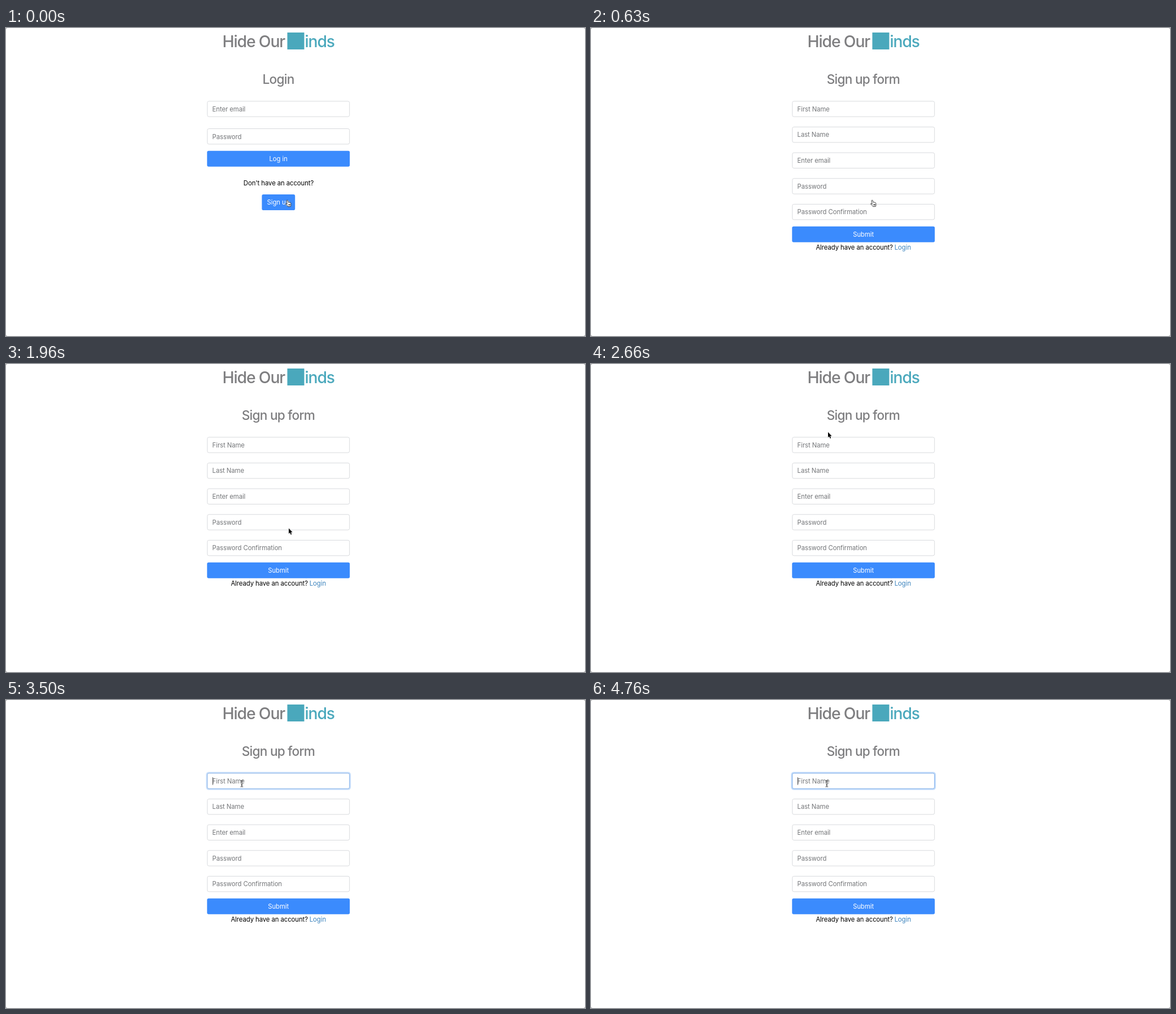
Recreate the animation shown at these times as an HTML page. Size 1026 by 546 pixels, loop 4.9 s.

```html
<!DOCTYPE html>
<html lang="en">
<head>
<meta charset="utf-8">
<title>Sign up</title>
<style>
  html, body { margin: 0; width: 100%; height: 100%; overflow: hidden; background: #fff; }
  svg { display: block; width: 100%; height: 100%; }
  text {
    font: 400 11.3px Inter, "Open Sans", sans-serif;
    font-optical-sizing: none;
    letter-spacing: -.06px;
    white-space: pre;
  }
  .brand { font-size: 28.3px; font-weight: 500; letter-spacing: -1.1px; }
  .heading { font-size: 22.7px; font-weight: 500; letter-spacing: -.78px; }
  .brand, .heading { fill: #7e7e80; }
  .mid { text-anchor: middle; }
  .hint { fill: #747679; }
  .light { fill: #fff; }
  .link { fill: #3b83bd; }
  .teal { fill: #4aa8bc; }
  .field { fill: #fff; stroke: #d8dadd; }
  .button { fill: #3b8bfd; }
</style>
</head>
<body>
<svg viewBox="0 0 1026 546" preserveAspectRatio="none">
  <rect width="1026" height="546" fill="#aaa"/>
  <rect width="1026" height="546" rx="3" fill="#fff"/>

  <text class="brand" x="383.5" y="34">Hide Our</text>
  <rect class="teal" x="498.5" y="8" width="30" height="30"/>
  <text class="brand teal" x="529.5" y="34">inds</text>

  <g id="login">
    <text class="heading mid" x="482.6" y="98.6">Login</text>
    <text class="mid" x="483" y="279">Don't have an account?</text>
    <rect id="buttonRing" x="452.4" y="293.9" width="60.8" height="30.2" rx="3.6"
          fill="none" stroke="#a9cffa" stroke-width="2.2"/>
    <rect class="button" x="453.4" y="295" width="58.8" height="28" rx="2.8"/>
    <text class="light mid" x="482.6" y="313.4">Sign up</text>
  </g>

  <g id="signup">
    <text class="heading mid" x="482.4" y="98.6">Sign up form</text>
    <text x="398.4" y="393">Already have an account?</text>
    <text class="link" x="537.8" y="393">Login</text>
  </g>

  <g id="focus">
    <rect x="355.6" y="128.6" width="254.3" height="29.8" rx="3.8"
          fill="none" stroke="#c3dcfa" stroke-width="2.4"/>
    <rect x="356.8" y="129.8" width="251.9" height="27.4" rx="2.8"
          fill="none" stroke="#85b4f0"/>
  </g>
  <path id="caret" d="M366.5 137V150.5" stroke="#333" stroke-width=".9"/>

  <path id="hand" fill="#fff" stroke="#222" stroke-width=".9" stroke-linejoin="round"
        d="M3 1.2Q3.9.6 4.4 1.8L5.6 5.2Q6.4 4.6 7 5.2Q7.9 4.7 8.5 5.4Q9.6 5.1 9.9 6.4L10.2 9.5Q10.2 10.6 9.6 12.4L5 12.6Q3.8 10.8 1 8.2Q.6 7 2 7.2L3.4 8.4L2.4 2.4Q2.3 1.5 3 1.2ZM6 8.2V10.6M7.4 8.2V10.6M8.7 8.2V10.4"/>
  <path id="arrow" fill="#000" stroke="#fff" stroke-width=".8" paint-order="stroke"
        d="M0 0V9.4L2.1 7.5L3.7 11.2L5.3 10.5L3.8 7H6.7Z"/>
  <path id="beam" fill="none" stroke="#222" stroke-width="1"
        d="M-2.2 -5.7Q0 -5.6 0 -4.4Q0 -5.6 2.2 -5.7M0 -4.4V4.4M-2.2 5.7Q0 5.6 0 4.4Q0 5.6 2.2 5.7M-1.3 2H1.3"/>
</svg>
<script>
const LOOP = 4900;
const byId = id => document.getElementById(id);

function add(parent, tag, attrs, text = '') {
  const node = document.createElementNS('http://www.w3.org/2000/svg', tag);
  for (const key in attrs) node.setAttribute(key, attrs[key]);
  node.textContent = text;
  parent.append(node);
}

function field(parent, y, hint) {
  add(parent, 'rect', { class: 'field', x: 356.8, y: y - 13.7, width: 251.9, height: 27.4, rx: 2.8 });
  add(parent, 'text', { class: 'hint', x: 365.6, y: y + 4.3 }, hint);
}

function wideButton(parent, y, label) {
  add(parent, 'rect', { class: 'button', x: 356.3, y: y - 14, width: 252.9, height: 28, rx: 2.8 });
  add(parent, 'text', { class: 'light mid', x: 482.7, y: y + 4.4 }, label);
}

// Hard steps: each [time, value] holds until the next one.
function play(id, property, steps) {
  const frames = steps.map(([time, value]) =>
    ({ offset: time / LOOP, [property]: value, easing: 'step-end' }));
  frames.push({ ...frames.at(-1), offset: 1 });
  byId(id).animate(frames, { duration: LOOP, iterations: Infinity });
}

const move = (x, y) => `translate(${x}px, ${y}px)`;

const login = byId('login');
field(login, 143.5, 'Enter email');
field(login, 192.2, 'Password');
wideButton(login, 231.8, 'Log in');

const signup = byId('signup');
['First Name', 'Last Name', 'Enter email', 'Password', 'Password Confirmation']
  .forEach((hint, i) => field(signup, 143.5 + 45.65 * i, hint));
wideButton(signup, 365.8, 'Submit');

byId('hand').style.transform = move(494.7, 304);
byId('beam').style.transform = move(417.8, 148.3);

play('login', 'opacity', [[0, 1], [630, 0]]);
play('signup', 'opacity', [[0, 0], [630, 1]]);
play('buttonRing', 'opacity', [[0, 0], [350, .5], [420, 1]]);
play('focus', 'opacity', [[0, 0], [3500, .9], [3570, 1]]);
play('caret', 'opacity', [[0, 0], [3500, 1], [4060, 0], [4550, 1]]);
play('hand', 'opacity', [[0, 1], [770, 0]]);
play('arrow', 'opacity', [[0, 0], [770, 1], [2870, 0]]);
play('beam', 'opacity', [[0, 0], [2870, 1]]);
play('arrow', 'transform', [
  [0, 501, 297], [840, 501, 291.3], [2030, 499, 283], [2100, 492, 258],
  [2240, 468, 206], [2310, 446, 164], [2450, 432, 138], [2520, 424, 127],
  [2660, 420, 120.7], [2800, 419, 134]
].map(([time, x, y]) => [time, move(x, y)]));
</script>
</body>
</html>
```
